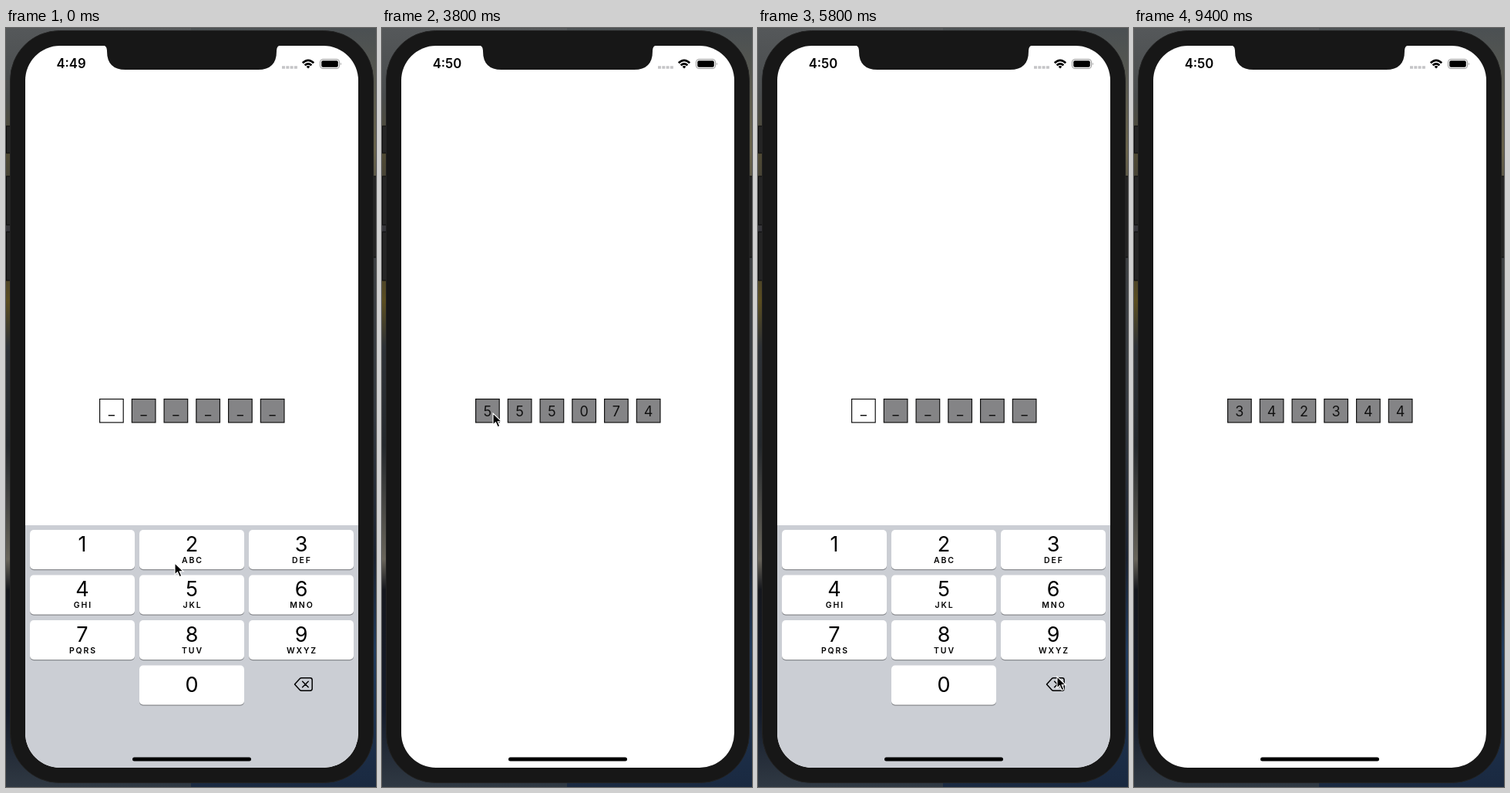
Write an HTML page that moves like this. It is 480 by 983 pixels and loops after 9.6 s.

```html
<!DOCTYPE html>
<html lang="en">
<head>
<meta charset="utf-8">
<title>Passcode entry</title>
<style>
  html, body { margin: 0; width: 100%; height: 100%; overflow: hidden; background: #171717; }
  svg { display: block; width: 480px; height: 983px; font-family: Inter, sans-serif; }
  text { text-anchor: middle; }
  .digit { font-size: 27px; }
  .letters { font-size: 10.5px; font-weight: 600; letter-spacing: 1.9px; }
  .cell rect { stroke: #111; stroke-width: 1.2; }
  .cell text { font-size: 18px; fill: #111; }
</style>
</head>
<body>
<svg viewBox="0 0 480 983">
  <defs>
    <linearGradient id="leftRock" x2="0" y2="1">
      <stop offset="0" stop-color="#55585a"/><stop offset=".09" stop-color="#484b4c"/>
      <stop offset=".16" stop-color="#514b34"/><stop offset=".27" stop-color="#34343a"/>
      <stop offset=".36" stop-color="#5a4d20"/><stop offset=".42" stop-color="#2d3136"/>
      <stop offset=".55" stop-color="#24282c"/><stop offset=".7" stop-color="#68645a"/>
      <stop offset=".74" stop-color="#15171d"/><stop offset=".9" stop-color="#141b2a"/>
      <stop offset="1" stop-color="#303943"/>
    </linearGradient>
    <linearGradient id="rightRock" x2="0" y2="1">
      <stop offset="0" stop-color="#4b5053"/><stop offset=".16" stop-color="#68624a"/>
      <stop offset=".3" stop-color="#3b3e41"/><stop offset=".5" stop-color="#353a40"/>
      <stop offset=".7" stop-color="#1a2230"/><stop offset=".82" stop-color="#203a5b"/>
      <stop offset="1" stop-color="#1a2940"/>
    </linearGradient>
    <clipPath id="screen"><rect x="25" y="23" width="432" height="935" rx="45"/></clipPath>
  </defs>

  <rect width="240" height="983" fill="url(#leftRock)"/>
  <rect x="240" width="240" height="983" fill="url(#rightRock)"/>
  <g fill="#242424" stroke="#0b0b0b">
    <rect x="0.5" y="127" width="8" height="35"/>
    <rect x="0.5" y="192" width="8" height="63"/>
    <rect x="0.5" y="264" width="8" height="63"/>
    <rect x="474" y="192" width="8" height="105"/>
  </g>
  <rect x="5.5" y="3.5" width="471" height="974" rx="64" fill="#171717" stroke="#222"/>

  <g clip-path="url(#screen)">
    <rect x="25" y="23" width="432" height="935" fill="#fff"/>
    <g id="cells"></g>
    <g id="keyboard">
      <rect x="25" y="644" width="432" height="360" fill="#cbced4"/>
      <g id="keys"></g>
      <path d="M374.5 850l6.6-7.2q.9-1 2.300-1h11.200q2.600 0 2.600 2.600v11.200q0 2.600-2.600 2.600h-11.200q-1.400 0-2.300-1zM384.600 846.200l7.600 7.600m0-7.600l-7.600 7.600"
            fill="none" stroke="#000" stroke-width="1.5" stroke-linejoin="round" stroke-linecap="round"/>
    </g>
    <rect x="164" y="944.5" width="154" height="5" rx="2.500"/>
  </g>

  <path d="M125 22q6 1 6 7v1q0 24 24 24h172q24 0 24-24v-1q0-6 6-7z" fill="#171717"/>
  <text id="clock" x="84.5" y="52.3" font-size="16.700" font-weight="600"></text>
  <path d="M358 51h20" stroke="#c5c5c7" stroke-width="3.500" stroke-dasharray="4 1.300"/>
  <g fill="none" stroke="#000" stroke-width="2.700">
    <path d="M384.800 45.200q7.200-6.800 14.400 0M387.600 48.300q4.400-4 8.800 0"/>
    <path d="M389.600 49.900q2.400-1.900 4.800 0l-2.400 2.600z" fill="#000" stroke="none"/>
  </g>
  <rect x="407.500" y="40.500" width="25" height="12" rx="3.500" fill="none" stroke="#999"/>
  <rect x="409.200" y="42.200" width="21.600" height="8.600" rx="2"/>
  <path d="M433.800 44.500q2 2 0 4z" fill="#999"/>

  <path id="cursor" d="M0 0v15l3.500-3.300 2.600 6 2.700-1.200-2.600-5.700h5z" stroke="#fff" stroke-width="1.100"/>
</svg>

<script>
const LOOP = 9600, STEP = 200;
const $ = id => document.getElementById(id);

// Key presses in time order; "<" deletes.
const presses = [
  [400, '5'], [600, '5'], [1000, '5'], [1400, '0'], [2000, '7'], [2720, '4'],
  ...Array.from({ length: 6 }, (_, i) => [4600 + 200 * i, '<']),
  [6200, '3'], [6400, '4'], [6800, '2'], [7000, '3'], [7200, '4'], [7733, '4'],
];

// Keyboard slides: [start, from, to] as vertical offsets.
const slides = [[0, 0, 0], [2733, 0, 314], [3870, 314, 0], [7733, 0, 314]];

// Pointer tip: [time, x, y].
const path = [
  [0, 219, 693], [400, 230, 725], [1000, 230, 727], [1200, 234, 823], [1400, 234, 823],
  [2000, 98, 787], [2400, 104, 726], [2800, 104, 726], [3600, 144, 499], [4000, 144, 499],
  [4200, 298, 663], [4600, 388, 840], [8000, 388, 840], [8400, 382, 826], [9200, 300, -24],
];

$('keys').innerHTML = ['1', '2 ABC', '3 DEF', '4 GHI', '5 JKL', '6 MNO', '7 PQRS', '8 TUV', '9 WXYZ', '', '0']
  .map((label, i) => {
    if (!label) return '';
    const [digit, letters = ''] = label.split(' ');
    const x = 31 + 142 * (i % 3), y = 650 + 58.5 * Math.floor(i / 3);
    return `<rect x="${x}" y="${y + 1.2}" width="136" height="51" rx="5" fill="#898b8f"/>
      <rect x="${x}" y="${y}" width="136" height="51" rx="5" fill="#fff"/>
      <text class="digit" x="${x + 68}" y="${y + (digit === '0' ? 34.3 : 27.5)}">${digit}</text>
      <text class="letters" x="${x + 69}" y="${y + 42.7}">${letters}</text>`;
  }).join('');

$('cells').innerHTML = Array.from({ length: 6 }, (_, i) => {
  const x = 121.6 + 41.75 * i;
  return `<g class="cell"><rect x="${x}" y="480.6" width="30.6" height="30.300"/><text x="${x + 15.3}"></text></g>`;
}).join('');
const cells = [...document.querySelectorAll('.cell')];

const codeAt = t => presses.reduce((code, [time, key]) =>
  time > t ? code : key === '<' ? code.slice(0, -1) : code + key, '');

function keyboardAt(t) {
  const [start, from, to] = slides.filter(s => s[0] <= t).pop();
  const u = (t - start) / 1000 * 18.26;
  return to + (from - to) * (1 + u) * Math.exp(-u);
}

function pointerAt(t) {
  const next = path.findIndex(p => p[0] > t);
  if (next < 0) return path[path.length - 1].slice(1);
  const [t0, x0, y0] = path[next - 1], [t1, x1, y1] = path[next];
  const u = (t - t0) / (t1 - t0), e = u * u * (3 - 2 * u);
  return [x0 + (x1 - x0) * e, y0 + (y1 - y0) * e];
}

function draw(t) {
  const code = codeAt(t);
  cells.forEach((cell, i) => {
    const [box, text] = cell.children;
    box.setAttribute('fill', i === code.length ? '#fff' : '#848486');
    text.textContent = code[i] || '_';
    text.setAttribute('y', code[i] ? 502.5 : 500.7);
  });
  $('clock').textContent = t < 3200 ? '4:49' : '4:50';
  $('keyboard').setAttribute('transform', `translate(0 ${keyboardAt(t)})`);
  $('cursor').setAttribute('transform', `translate(${pointerAt(t)})`);
}

function tick() {
  draw(Math.floor(performance.now() % LOOP / STEP) * STEP);
  requestAnimationFrame(tick);
}
tick();
</script>
</body>
</html>
```
